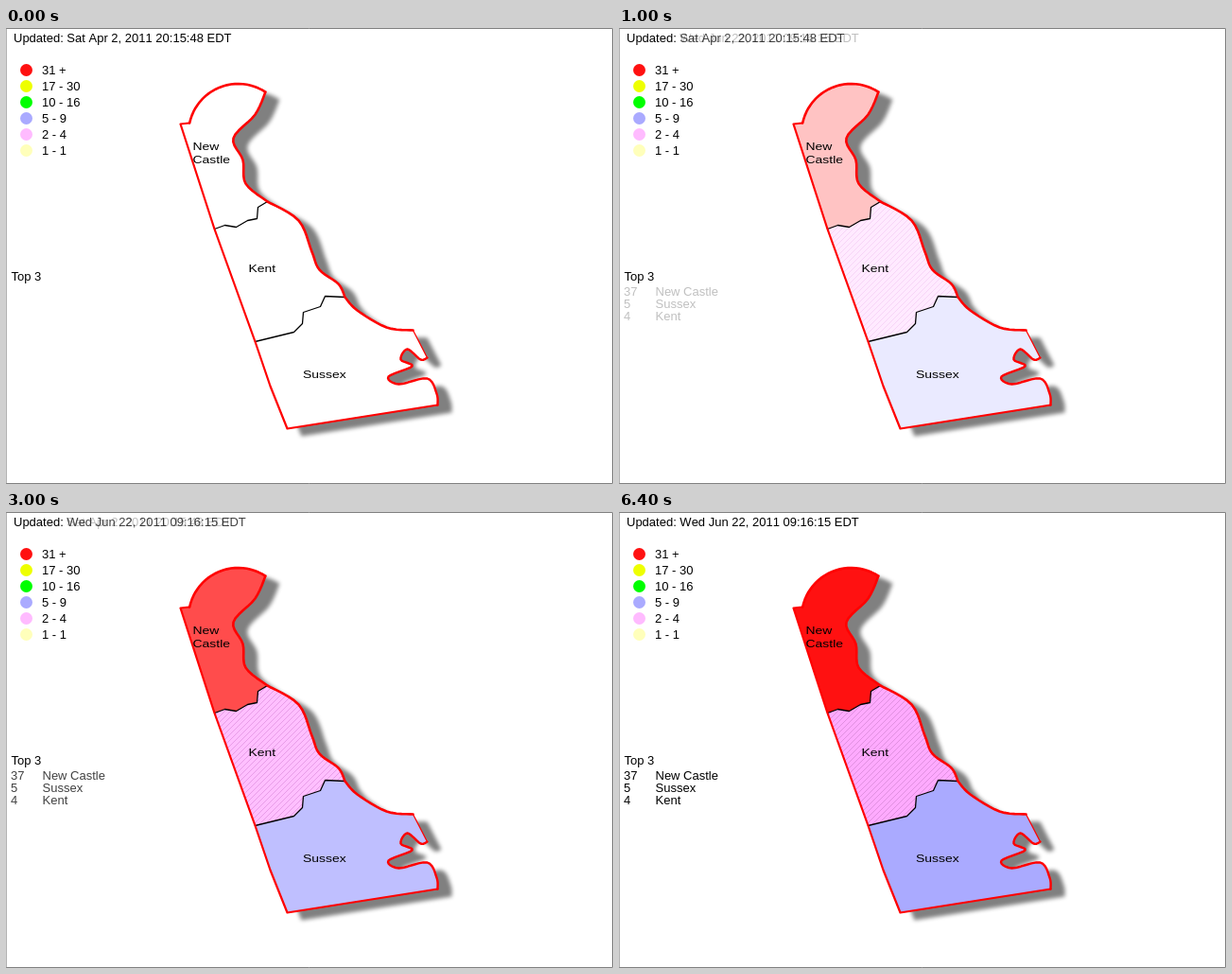
Write an HTML page with a canvas that moves like this. It is 642 px wide and 482 px high and loops after 8 s.

```html
<!DOCTYPE html>
<html lang="en">
<head>
<meta charset="utf-8">
<title>County map</title>
<style>
html, body { margin: 0; width: 100%; height: 100%; overflow: hidden; background: #fff; }
canvas { display: block; }
</style>
</head>
<body>
<canvas id="map" width="642" height="482"></canvas>
<script>
const ctx = document.getElementById('map').getContext('2d');
const FONT = '"Liberation Sans", Arial, sans-serif';
const LOOP = 8000, STEP = 1000, STEPS = 4;

// "x,y x,y ..." -> points on pixel centres
const pts = s => s.split(' ').map(p => p.split(',').map(n => +n + 0.5));

// Catmull-Rom curve through a few key points
function curve(s, n = 6) {
  const p = pts(s), out = [];
  for (let i = 0; i < p.length - 1; i++) {
    const a = p[i], b = p[i + 1], before = p[i - 1] || a, after = p[i + 2] || b;
    for (let j = 0; j < n; j++) {
      const t = j / n;
      out.push([0, 1].map(d => a[d] + 0.5 * t * (b[d] - before[d]
        + t * (2 * before[d] - 5 * a[d] + 4 * b[d] - after[d]
        + t * (3 * (a[d] - b[d]) + after[d] - before[d])))));
    }
  }
  return [...out, p[p.length - 1]];
}

function circleArc(cx, cy, r, from, to, n = 24) {
  return Array.from({ length: n + 1 }, (_, i) => {
    const a = from + (to - from) * i / n;
    return [cx + r * Math.cos(a), cy + r * Math.sin(a)];
  });
}

const dome = circleArc(245.5, 111.5, 52.5, -2.93, -0.99);
const upperCoast = curve('274,67 263,91 240,116 250,139 253,164 276,183');
const midCoast = curve('276,183 309,203 323,236 331,255 351,270 358,284');
const lowCoast = curve('358,284 371,298 402,316 430,319');
const cape = pts('430,319 445,348');
const bay = curve('445,348 438,350 424,339 417,350 429,357 404,368 415,376 445,370 455,386 456,398');
const south = pts('456,398 297,423');
const westLow = pts('297,423 279,378 263,331');
const westMid = pts('263,331 220,212');
const westTop = pts('220,212 184,101 193,100');
const upperLine = pts('220,212 231,208 243,210 255,203 265,201 266,189 276,183');
const lowerLine = pts('263,331 304,321 313,312 314,300 332,294 337,283 358,284');

const back = a => [...a].reverse();
const path = (...parts) => {
  const p = new Path2D();
  parts.flat().forEach(([x, y], i) => i ? p.lineTo(x, y) : p.moveTo(x, y));
  return p;
};

const state = path(dome, upperCoast, midCoast, lowCoast, cape, bay, south, westLow, westMid, westTop);
const kent = path(upperLine, midCoast, back(lowerLine), westMid);
const counties = [
  [path(dome, upperCoast, back(upperLine), westTop), '#ff1111'],
  [kent, '#ffaaff'],
  [path(lowerLine, lowCoast, cape, bay, south, westLow), '#aaaaff']
];

const lines = [
  [path(upperLine), '#000', 1.3],
  [path(lowerLine), '#000', 1.3],
  [path(cape), '#f00', 1.3],
  [path(south, westLow, westMid, westTop), '#f00', 2.2],
  [path(dome, upperCoast, midCoast, lowCoast), '#f00', 2.6],
  [path(bay), '#f00', 2.4]
];

const legend = [
  ['#ff1111', '31 +'], ['#eeff00', '17 - 30'], ['#00ff00', '10 - 16'],
  ['#aaaaff', '5 - 9'], ['#ffbbff', '2 - 4'], ['#ffffbb', '1 - 1']
];
const top3 = [['37', 'New Castle'], ['5', 'Sussex'], ['4', 'Kent']];
const labels = [['New', 197.5, 129], ['Castle', 197.5, 143], ['Kent', 256.5, 258], ['Sussex', 314, 370]];

function text(s, x, y, alpha = 1) {
  ctx.globalAlpha = alpha;
  ctx.fillStyle = '#000';
  ctx.fillText(s, x, y);
  ctx.globalAlpha = 1;
}

function hatch(area) {
  ctx.save();
  ctx.clip(area);
  ctx.beginPath();
  for (let c = 400; c < 660; c += 6) {
    ctx.moveTo(c - 160, 160);
    ctx.lineTo(c - 340, 340);
  }
  ctx.strokeStyle = '#e090e0';
  ctx.lineWidth = 1;
  ctx.stroke();
  ctx.restore();
}

function drawMap(k) {
  ctx.save();
  ctx.shadowColor = '#808080';
  ctx.shadowBlur = 4;
  ctx.shadowOffsetX = 15;
  ctx.shadowOffsetY = 8;
  ctx.fillStyle = '#fff';
  ctx.fill(state);
  ctx.restore();

  ctx.globalAlpha = k;
  for (const [area, color] of counties) {
    ctx.fillStyle = color;
    ctx.fill(area);
  }
  hatch(kent);
  ctx.globalAlpha = 1;

  ctx.lineJoin = ctx.lineCap = 'round';
  for (const [line, color, width] of lines) {
    ctx.strokeStyle = color;
    ctx.lineWidth = width;
    ctx.stroke(line);
  }

  // map labels use a wide face
  ctx.font = '11px ' + FONT;
  for (const [s, x, y] of labels) {
    ctx.save();
    ctx.translate(x, y);
    ctx.scale(1.27, 1);
    text(s, 0, 0);
    ctx.restore();
  }
}

function drawText(k) {
  ctx.font = '13px ' + FONT;
  const head = 'Updated: ';
  const x = 8 + ctx.measureText(head).width;
  ctx.fontKerning = 'none';
  text(head, 8, 15);
  text('Sat Apr 2, 2011 20:15:48 EDT', x, 15, 1 - k);
  text('Wed Jun 22, 2011 09:16:15 EDT', x, 15, k);
  ctx.fontKerning = 'auto';

  text('Top 3', 5.5, 267);
  top3.forEach(([count, name], n) => {
    const y = 283 + n * 13;
    text(count, 5, y, k);
    text(name, 38.5, y, k);
  });
}

function drawLegend() {
  legend.forEach(([color, range], n) => {
    ctx.fillStyle = color;
    ctx.beginPath();
    ctx.arc(21.5, 44.5 + n * 17, 6.5, 0, Math.PI * 2);
    ctx.fill();
    text(range, 38, 49 + n * 17);
  });
}

function draw(now) {
  const k = Math.min(Math.floor(now % LOOP / STEP), STEPS) / STEPS;
  ctx.fillStyle = '#fff';
  ctx.fillRect(0, 0, 642, 482);
  drawMap(k);
  drawText(k);
  drawLegend();
  ctx.strokeStyle = '#808080';
  ctx.lineWidth = 1;
  ctx.strokeRect(0.5, 0.5, 641, 481);
}

const start = performance.now();
function tick() {
  draw(performance.now() - start);
  requestAnimationFrame(tick);
}
tick();
</script>
</body>
</html>
```
